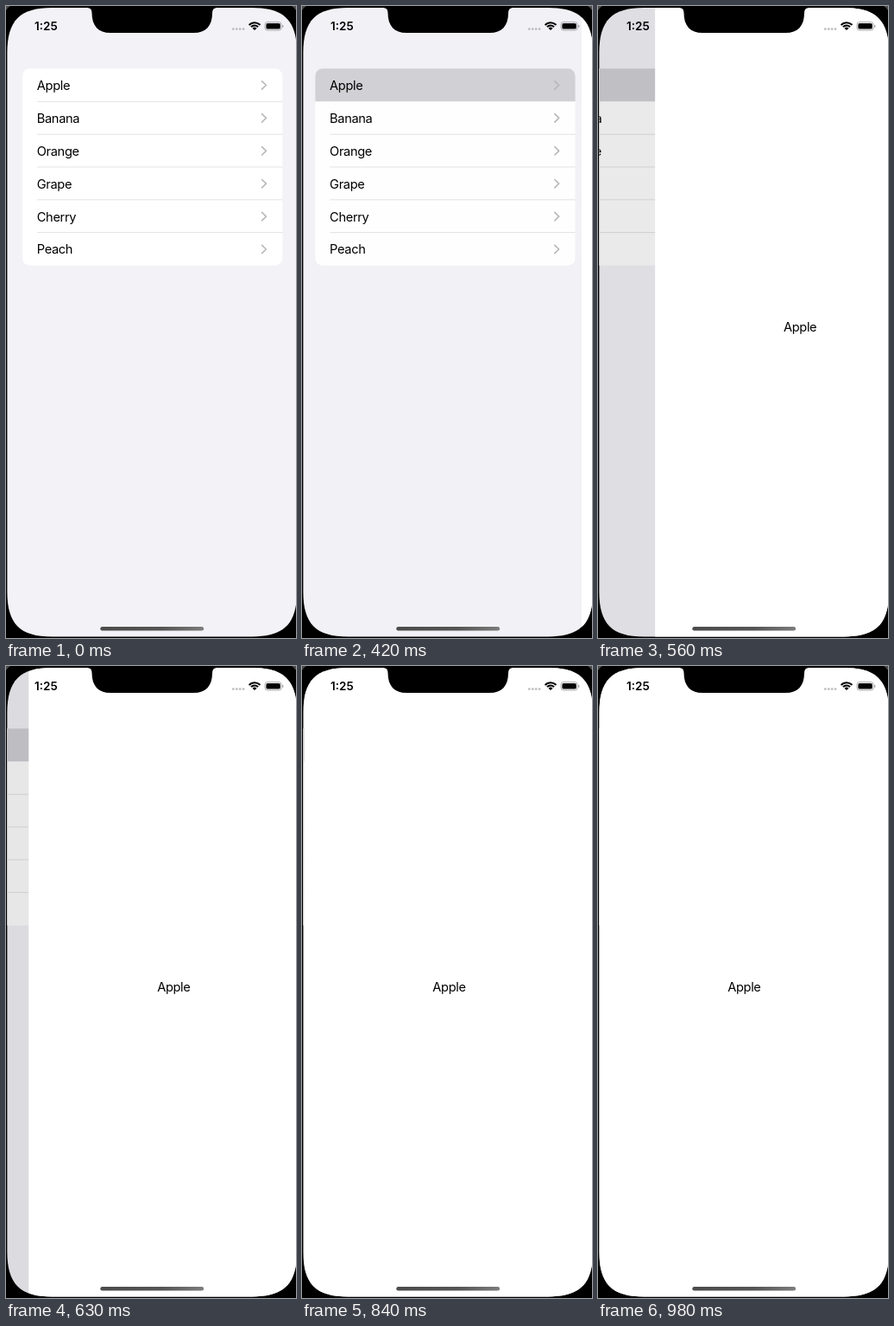
An HTML page with a canvas for the animation above (1470 ms loop, 336x730 px).

```html
<!DOCTYPE html>
<html lang="en">
<head>
<meta charset="utf-8">
<title>List navigation</title>
<style>
html, body { margin: 0; width: 100%; height: 100%; overflow: hidden; background: #000; }
canvas { display: block; width: 336px; height: 730px; }
</style>
</head>
<body>
<canvas id="stage"></canvas>
<script>
const W = 336, H = 730, LOOP = 1470, PUSH = 420, STEP = 70;
const FONT = 'Inter, "Liberation Sans", sans-serif';
const FRUITS = ['Apple', 'Banana', 'Orange', 'Grape', 'Cherry', 'Peach'];
const SCREEN = { l: 1.4, t: 2, r: 337, b: 728.4 };
const ROW = 37.9, TOP = 72.3, TRAVEL = 335;

const canvas = document.getElementById('stage');
const ratio = window.devicePixelRatio || 1;
canvas.width = W * ratio;
canvas.height = H * ratio;
const ctx = canvas.getContext('2d');

function rounded(x, y, w, h, r, fill) {
  ctx.beginPath();
  ctx.roundRect(x, y, w, h, r);
  ctx.fillStyle = fill;
  ctx.fill();
}

function label(text, x, y, align = 'left', size = 14.65, weight = 400, spacing = -0.37) {
  ctx.font = `${weight} ${size}px ${FONT}`;
  ctx.letterSpacing = spacing + 'px';
  ctx.textAlign = align;
  ctx.fillStyle = '#000';
  ctx.fillText(text, x, y);
}

// Screen outline with continuous corners
function screenPath() {
  const { l, t, r, b } = SCREEN, e = 52, c = 14.7;
  ctx.beginPath();
  ctx.moveTo(l + e, t);
  ctx.lineTo(r - e, t);
  ctx.bezierCurveTo(r - c, t, r, t + c, r, t + e);
  ctx.lineTo(r, b - e);
  ctx.bezierCurveTo(r, b - c, r - c, b, r - e, b);
  ctx.lineTo(l + e, b);
  ctx.bezierCurveTo(l + c, b, l, b - c, l, b - e);
  ctx.lineTo(l, t + e);
  ctx.bezierCurveTo(l, t + c, l + c, t, l + e, t);
  ctx.closePath();
}

function drawBody() {
  ctx.fillStyle = '#000';
  ctx.fillRect(0, 0, W, H);
  ctx.fillStyle = '#4a4a4a';
  for (const [x, y, s] of [[0, 0, 1], [W, 0, -1]]) {
    ctx.beginPath();
    ctx.moveTo(x, y);
    ctx.lineTo(x + 5 * s, y);
    ctx.quadraticCurveTo(x + 2 * s, y + 2, x, y + 5);
    ctx.fill();
  }
}

function drawChevron(x, y) {
  ctx.beginPath();
  ctx.moveTo(x, y - 4.7);
  ctx.lineTo(x + 4.9, y);
  ctx.lineTo(x, y + 4.7);
  ctx.strokeStyle = '#b9b9bc';
  ctx.lineWidth = 1.6;
  ctx.lineCap = ctx.lineJoin = 'round';
  ctx.stroke();
}

function drawList(dx, pressed) {
  ctx.fillStyle = '#f2f2f7';
  ctx.fillRect(0, 0, W, H);
  ctx.save();
  ctx.translate(dx, 0);
  rounded(19, TOP, 301.3, ROW * FRUITS.length, 8.5, '#fff');
  if (pressed) rounded(19, TOP, 301.3, ROW, [8.5, 8.5, 0, 0], '#d1d1d6');
  FRUITS.forEach((name, i) => {
    const y = TOP + i * ROW;
    if (i > (pressed ? 1 : 0)) {
      ctx.fillStyle = '#c6c6c8';
      ctx.fillRect(36, y - 0.25, 284.3, 0.5);
    }
    label(name, 35.8, y + 24.6);
    drawChevron(296.5, y + 19.2);
  });
  ctx.restore();
}

function drawDetail(x) {
  ctx.fillStyle = '#fff';
  ctx.fillRect(SCREEN.l + x, 0, W, H);
  label(FRUITS[0], 169.4 + x, 376.4, 'center');
}

function drawNotch() {
  const t = SCREEN.t;
  ctx.beginPath();
  ctx.moveTo(94, 0);
  ctx.lineTo(94, t);
  ctx.quadraticCurveTo(99.5, t, 99.5, t + 6);
  ctx.bezierCurveTo(99.5, 23, 107, 31, 121, 31);
  ctx.lineTo(217.5, 31);
  ctx.bezierCurveTo(231.5, 31, 239, 23, 239, t + 6);
  ctx.quadraticCurveTo(239, t, 244.5, t);
  ctx.lineTo(244.5, 0);
  ctx.fillStyle = '#000';
  ctx.fill();
}

function drawWifi(x, y) {
  const a = Math.PI * 0.26, up = -Math.PI / 2;
  ctx.strokeStyle = ctx.fillStyle = '#000';
  ctx.lineCap = 'butt';
  ctx.lineWidth = 2;
  for (const r of [8.8, 5.6]) {
    ctx.beginPath();
    ctx.arc(x, y, r, up - a, up + a);
    ctx.stroke();
  }
  ctx.beginPath();
  ctx.moveTo(x, y);
  ctx.arc(x, y, 3.4, up - a, up + a);
  ctx.fill();
}

function drawStatus() {
  label('1:25', 46.4, 28.3, 'center', 13.5, 600, 0);
  for (let i = 0; i < 4; i++) rounded(262 + i * 3.9, 25.2, 2.7, 2.7, 1.35, '#bcbcbf');
  drawWifi(288, 28);
  ctx.beginPath();
  ctx.roundRect(300, 18.6, 19.2, 9.4, 3);
  ctx.strokeStyle = '#a2a2a5';
  ctx.lineWidth = 0.9;
  ctx.stroke();
  rounded(301.4, 20, 16.4, 6.6, 1.7, '#000');
  rounded(320.2, 21.8, 1.2, 3, 0.6, '#a2a2a5');

  const bar = ctx.createLinearGradient(109, 0, 229, 0);
  bar.addColorStop(0, '#4c4c4c');
  bar.addColorStop(0.6, '#555');
  bar.addColorStop(1, '#7c7c7c');
  rounded(109.3, 717, 119.8, 4.4, 2.2, bar);
}

// Share of the push still to go: a critically damped spring sampled per step
function remaining(t) {
  if (t < PUSH) return 1;
  const k = Math.floor((t - PUSH) / STEP);
  if (k >= 8) return 0;
  const u = k ? 0.6 + 1.22 * k : 0.3;
  return (1 + u) * Math.exp(-u);
}

function draw(t) {
  const left = remaining(t), done = 1 - left;
  ctx.setTransform(ratio, 0, 0, ratio, 0, 0);
  drawBody();
  ctx.save();
  screenPath();
  ctx.clip();
  drawList(-100 * done, t >= PUSH);
  ctx.fillStyle = `rgba(0,0,0,${0.1 * done})`;
  ctx.fillRect(0, 0, W, H);
  if (t >= PUSH) drawDetail(TRAVEL * left);
  drawStatus();
  ctx.restore();
  drawNotch();
}

const start = performance.now();
function tick() {
  draw((performance.now() - start) % LOOP);
  requestAnimationFrame(tick);
}
tick();
</script>
</body>
</html>
```
